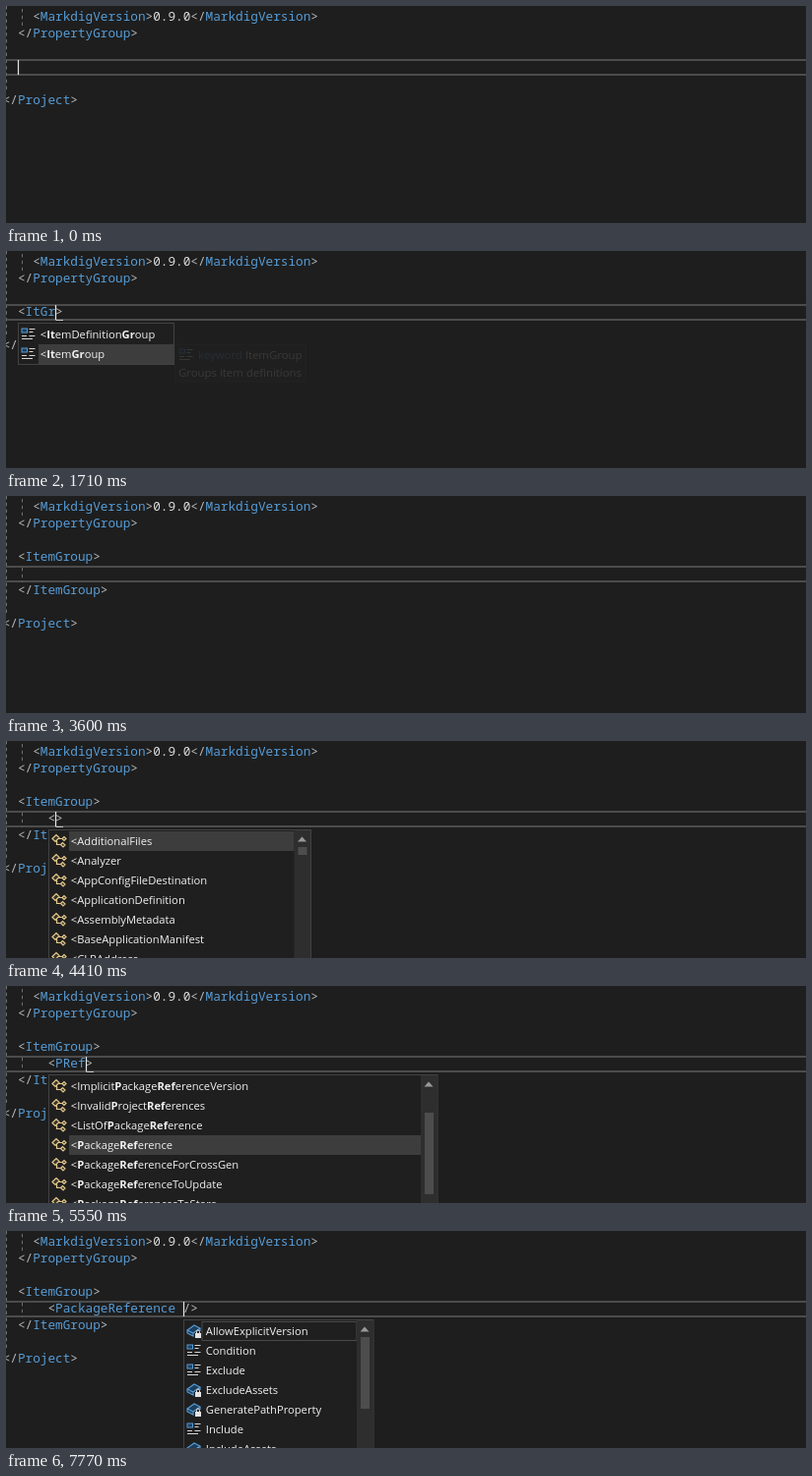
An HTML page for the animation above (8000 ms loop, 812 by 221 pixels).

```html
<!DOCTYPE html>
<html lang="en">
<head>
<meta charset="utf-8">
<title>Project file completion</title>
<style>
  html, body { margin: 0; width: 100%; height: 100%; overflow: hidden; background: #1e1e1e; }
  svg { display: block; width: 812px; height: 221px; }
  text { white-space: pre; }
  .code { font: 12.71px "Noto Sans Mono", "DejaVu Sans Mono", monospace; }
  .ui { font: 11.2px "Open Sans", "Noto Sans", sans-serif; fill: #f1f1f1; }
  .tip { font-size: 11.4px; }
  .b { font-weight: 700; }
</style>
</head>
<body>
<svg id="stage" viewBox="0 0 812 221"></svg>
<script>
const LOOP = 8000, CHAR = 7.626, LEFT = -3.3, ROW = 17, ITEM = 20;
const BLUE = '#569cd6', TEAL = '#4ec9b0', GRAY = '#b8b8b8', PALE = '#dcdcdc';
const stage = document.getElementById('stage');

const esc = s => s.replace(/&/g, '&amp;').replace(/</g, '&lt;').replace(/>/g, '&gt;');
const span = (s, fill) => `<tspan fill="${fill}">${esc(s)}</tspan>`;
const rect = (x, y, w, h, fill, extra = '') =>
  `<rect x="${x}" y="${y}" width="${w}" height="${h}" fill="${fill}" ${extra}/>`;
const path = (d, stroke, width = 1, extra = 'fill="none"') =>
  `<path d="${d}" stroke="${stroke}" stroke-width="${width}" ${extra}/>`;
const colX = col => LEFT + col * CHAR;
const rowY = row => 3 + row * ROW;

const icons = {
  element: rect(1, 2, 5.5, 4, '#1e3f5c', `stroke="${BLUE}"`) +
    path('M8.5 2.5h6M8.5 5.5h4M1 9.5h5M8.5 9.5h6M1 12.5h11', '#d6d6d6'),
  item: path('M1 5.5l4-4 3 3-4 4zM7 5.5h4M5.5 7.5v4h4M11 5.5l2-2 2 2-2 2zM9.5 11.5l2-2 2.5 2.5-2 2z',
    '#e3c88c', 1.2, 'fill="#3a3327"'),
  property: path('M1 7l7-5 6 3-7 5zM1 7v3l6 3v-3M14 5v3', BLUE, 1.1, 'fill="#1e3f5c"') +
    rect(9, 10, 6, 5, '#e4e4e4') + path('M10.5 10v-1.5a1.5 1.5 0 0 1 3 0v1.5', '#e4e4e4')
};
const icon = (name, x, y) => `<g transform="translate(${x} ${y})">${icons[name]}</g>`;

const tags = s => s.split(' ').map(n => '<' + n);
const lists = {
  root: { icon: 'element', w: 158, items: tags('!-- ![CDATA[ Choose Import ImportGroup ItemDefinitionGroup ItemGroup ProjectExtensions') },
  imports: { icon: 'element', w: 158, items: tags('Import ImportGroup ItemDefinitionGroup ItemGroup') },
  groups: { icon: 'element', w: 158, items: tags('ItemDefinitionGroup ItemGroup') },
  all: { icon: 'item', w: 266, thumb: [108, 8],
    items: tags('AdditionalFiles Analyzer AppConfigFileDestination ApplicationDefinition AssemblyMetadata BaseApplicationManifest CLRAddress') },
  pack: { icon: 'item', w: 266, thumb: [156, 8],
    items: tags('NuGetPackInput NuGetPackOutput NuGetPreprocessorValue PRIResource PackAsToolShimAppHostPack PackageConflictOverrides PackageConflictPlatformManifests') },
  refs: { icon: 'item', w: 394.5, thumb: [129, 83],
    items: tags('ImplicitPackageReferenceVersion InvalidProjectReferences ListOfPackageReference PackageReference PackageReferenceForCrossGen PackageReferenceToUpdate PackageReferencesToStore') },
  attrs: { icon: 'property', w: 192.5, thumb: [108, 73], soft: true,
    items: 'AllowExplicitVersion Condition Exclude ExcludeAssets GeneratePathProperty Include IncludeAssets'.split(' ') }
};
const plainAttrs = ['Condition', 'Exclude', 'Include'];

const tips = {
  group: { icon: 'element', w: 133, h: 38, kind: 'keyword', name: 'ItemGroup', lines: ['Groups item definitions'] },
  pri: { icon: 'item', w: 520, h: 90, kind: 'item', name: 'PRIResource', type: 'enum list',
    lines: ['Seen in:', 'C:\\Program Files\\dotnet\\sdk\\7.0.400-preview.23274.1\\Sdks\\Microsoft.NET.Sdk\\targets\\Microsoft.NET.Sdk.props'] },
  ref: { icon: 'item', w: 400, h: 90, kind: 'item', name: 'PackageReference', type: 'enum list',
    lines: ['Reference to a NuGet package', 'Seen in:', 'C:\\Program Files\\dotnet\\sdk\\7.0.400-preview.23274.1\\Sdks\\Microsoft.NET.Sdk'] }
};

// Each step changes only the listed parts of the state.
const steps = [
  [0, { line: '', col: 0, caret: 1, open: false, list: null, sel: 0, query: '', tip: null, fade: 0 }],
  [130, { line: '<>', col: 1 }],
  [260, { list: 'root' }],
  [460, { line: '<I>', col: 2, list: 'imports', query: 'I' }],
  [720, { line: '<It>', col: 3, list: 'groups', query: 'It' }],
  [1050, { line: '<ItG>', col: 4, sel: 1, query: 'ItG' }],
  [1250, { line: '<ItGr>', col: 5, query: 'ItGr' }],
  [1710, { tip: 'group', fade: .12 }],
  [1780, { fade: .55 }],
  [1850, { fade: 1 }],
  [1930, { line: '<ItemGroup>', col: 10, list: null, tip: null }],
  [2470, { caret: 0 }],
  [2670, { line: '<ItemGroup></ItemGroup>', col: 11, caret: 1 }],
  [3000, { line: '', col: 0, open: true }],
  [3600, { caret: 0 }],
  [3800, { caret: .5 }],
  [3880, { caret: 1 }],
  [4280, { line: '<>', col: 1 }],
  [4350, { list: 'all', sel: 0, query: '' }],
  [4610, { line: '<P>', col: 2 }],
  [4680, { list: 'pack', sel: 3, query: 'P' }],
  [5150, { caret: 0 }],
  [5220, { tip: 'pri', fade: .5 }],
  [5290, { fade: 1 }],
  [5350, { line: '<PR>', col: 3, caret: 1, list: 'refs', query: 'PR', tip: null }],
  [5480, { line: '<PRe>', col: 4, query: 'PRe' }],
  [5550, { line: '<PRef>', col: 5, query: 'PRef' }],
  [6010, { caret: 0, tip: 'ref', fade: .4 }],
  [6080, { fade: 1 }],
  [6480, { caret: 1 }],
  [6950, { line: '<PackageReference />', col: 17, list: null, tip: null }],
  [7420, { caret: 0 }],
  [7710, { col: 18, caret: 1 }],
  [7770, { list: 'attrs', sel: 0, query: '' }]
];

function codeLine(s, col, row) {
  let inTag = false;
  const parts = s.split(/(<\/?|\/?>)/).map(part => {
    if (/^[<>/]/.test(part)) {
      inTag = part[0] === '<';
      return span(part, GRAY);
    }
    return span(part, inTag ? BLUE : PALE);
  });
  return `<text class="code" x="${colX(col)}" y="${rowY(row) + 12}">${parts.join('')}</text>`;
}

// Bolds each capitalised piece of the query in turn.
function highlight(label, query) {
  let out = '', rest = label;
  for (const hump of query.match(/[A-Z][a-z]*/g) || []) {
    const at = rest.indexOf(hump);
    if (at < 0) break;
    out += esc(rest.slice(0, at)) + `<tspan class="b">${hump}</tspan>`;
    rest = rest.slice(at + hump.length);
  }
  return out + esc(rest);
}

function popup(list, s, x, y) {
  const h = Math.min(list.items.length, 8) * ITEM + 2;
  const bar = list.thumb ? 17 : 0;
  const right = x + list.w;
  let out = rect(x, y, list.w, h, '#1f1f1f', 'stroke="#424242"');
  list.items.forEach((label, i) => {
    const top = y + 1.5 + i * ITEM;
    if (i === s.sel) {
      const selW = list.w - 20.5 - bar;
      out += list.soft
        ? rect(x + 18.5, top + .5, selW + 2, 19, 'none', 'stroke="#4a4a4a"')
        : rect(x + 20.5, top, selW, ITEM, '#3d3d3d');
    }
    const kind = list.soft && plainAttrs.includes(label) ? 'element' : list.icon;
    out += icon(kind, x + 2.5, top + 2) +
      `<text class="ui" x="${x + 22.3}" y="${top + 14}">${highlight(label, s.query)}</text>`;
  });
  if (bar) {
    const [ty, th] = list.thumb;
    out += rect(right - bar, y + .5, bar - .5, h, '#2e2e2e') +
      `<path d="M${right - 13.5} ${y + 12}h9l-4.5 -5z" fill="#999"/>` +
      rect(right - 13, ty, 9, th, '#4d4d4d');
  }
  return out;
}

function tooltip(tip, fade, x, y) {
  const head = span(tip.kind, BLUE) + ' ' + tip.name + (tip.type ? ' : ' + span(tip.type, TEAL) : '');
  const body = tip.lines.map((line, i) =>
    `<text class="ui tip" x="${x + 3.5}" y="${y + 32.5 + i * 17.6}">${esc(line)}</text>`).join('');
  return `<g opacity="${fade}">` + rect(x, y, tip.w, tip.h, '#2a2a2a', 'stroke="#424242"') +
    icon(tip.icon, x + 3.5, y + 3) +
    `<text class="ui tip" x="${x + 23.5}" y="${y + 15}">${head}</text>${body}</g>`;
}

const guide = (x, y1, y2) => path(`M${x} ${y1}V${y2}`, '#707070', 1, 'stroke-dasharray="3.4 3.4"');

function draw(s) {
  const row = s.open ? 4 : 3, indent = s.open ? 6 : 2, top = rowY(row);
  const caretX = Math.round(colX(indent + s.col)) + .5;
  let out = rect(0, 0, 812, 221, '#1e1e1e') +
    guide(.5, 0, rowY(s.open ? 7 : 5)) + guide(16.5, 3, 20) +
    (s.open ? guide(16.5, top + 2, top + 17) : '') +
    path(`M0 ${top + 1}H812M0 ${top + 16}H812`, '#5c5c5c', 1.4) +
    codeLine('<MarkdigVersion>0.9.0</MarkdigVersion>', 4, 0) +
    codeLine('</PropertyGroup>', 2, 1) +
    codeLine('</Project>', 0, s.open ? 7 : 5) +
    codeLine(s.line, indent, row);
  if (s.open) out += codeLine('<ItemGroup>', 2, 3) + codeLine('</ItemGroup>', 2, 5);
  if (s.list && s.list !== 'attrs')
    out += path(`M${caretX} ${top + 16.5}h7.5`, '#c8c8c8');
  if (s.caret)
    out += path(`M${caretX} ${top + 1}v15`, '#e6e6e6', 1.2, `opacity="${s.caret}"`);
  if (s.list) {
    const list = lists[s.list];
    const x = s.list === 'attrs' ? 180.5 : s.open ? 43.5 : 12.5, y = top + 19.5;
    out += popup(list, s, x, y);
    if (s.tip) out += tooltip(tips[s.tip], s.fade, x + list.w + 1, y + 1.5 + s.sel * ITEM);
  }
  stage.innerHTML = out;
}

let shown = -1;
function frame(now) {
  const t = now % LOOP;
  const count = steps.filter(([at]) => at <= t).length;
  if (count !== shown) {
    shown = count;
    draw(Object.assign({}, ...steps.slice(0, count).map(step => step[1])));
  }
  requestAnimationFrame(frame);
}
const start = performance.now();
const tick = frame;
frame(0);
function frameTime() { return performance.now() - start; }
</script>
</body>
</html>
```
